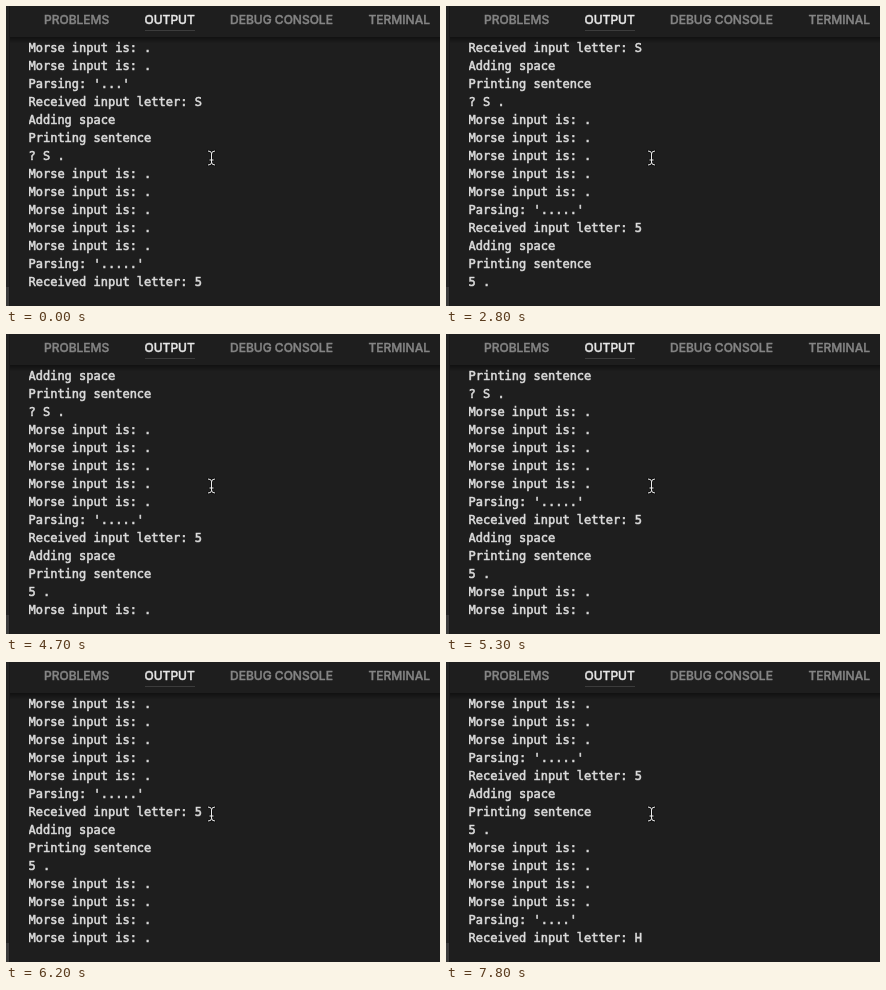
Write an HTML page that moves like this. It is 434x300 px and loops after 8 s.

```html
<!DOCTYPE html>
<html lang="en">
<head>
<meta charset="utf-8">
<title>Morse output panel</title>
<style>
  html, body { margin: 0; width: 100%; height: 100%; overflow: hidden; background: #1e1e1e; }
  .panel { position: relative; width: 434px; height: 300px; overflow: hidden; background: #1e1e1e; }
  .chrome { position: absolute; left: 0; top: 0; }
  .tab { font: 500 12px Inter, sans-serif; fill: #858585; stroke: #858585; stroke-width: .4px; }
  .tab.active { fill: #e7e7e7; stroke: #e7e7e7; }
  .output { position: absolute; left: 22.5px; top: 33px; width: 400px; height: 252px; overflow: hidden; }
  .log {
    --row: -18px;
    margin: 0;
    font: 12px/18px "DejaVu Sans Mono", monospace;
    color: #dcdcdc;
    -webkit-text-stroke: .55px #dcdcdc;
    animation: scroll 8s step-end infinite;
  }
  /* Each jump reveals newly printed lines at the bottom. */
  @keyframes scroll {
    0%     { transform: none; }
    10%    { transform: translateY(var(--row)); }
    35%    { transform: translateY(calc(3 * var(--row))); }
    58.75% { transform: translateY(calc(4 * var(--row))); }
    66.25% { transform: translateY(calc(5 * var(--row))); }
    71.25% { transform: translateY(calc(6 * var(--row))); }
    77.5%  { transform: translateY(calc(7 * var(--row))); }
    90%, 100% { transform: translateY(calc(9 * var(--row))); }
  }
</style>
</head>
<body>
<div class="panel">
  <div class="output"><pre class="log">Morse input is: .
Morse input is: .
Parsing: '...'
Received input letter: S
Adding space
Printing sentence
? S .
Morse input is: .
Morse input is: .
Morse input is: .
Morse input is: .
Morse input is: .
Parsing: '.....'
Received input letter: 5
Adding space
Printing sentence
5 .
Morse input is: .
Morse input is: .
Morse input is: .
Morse input is: .
Parsing: '....'
Received input letter: H</pre></div>
  <svg class="chrome" width="434" height="300">
    <defs>
      <linearGradient id="shade" x2="0" y2="1">
        <stop offset="0" stop-color="#000" stop-opacity=".4"/>
        <stop offset="1" stop-color="#000" stop-opacity="0"/>
      </linearGradient>
      <path id="beam" d="M202.500 145q3 0 3 2.500v9q0 2.500-3 2.500M208.500 145q-3 0-3 2.500M205.500 156.500q0 2.500 3 2.500M204 154h3"/>
    </defs>
    <rect x="3" y="31" width="431" height="6" fill="url(#shade)"/>
    <rect width="3" height="300" fill="#232323"/>
    <rect y="281" width="3" height="19" fill="#3a3a3a"/>
    <rect x="3" width="1" height="300" fill="#191919"/>
    <text class="tab" x="38" y="18">PROBLEMS</text>
    <text class="tab active" x="138.5" y="18">OUTPUT</text>
    <text class="tab" x="224" y="18">DEBUG CONSOLE</text>
    <text class="tab" x="362.5" y="18">TERMINAL</text>
    <rect x="139" y="24" width="50" height="1" fill="#3c3c3c"/>
    <g fill="none" stroke-linecap="square">
      <use href="#beam" stroke="#111" stroke-width="2.4"/>
      <use href="#beam" stroke="#eee"/>
    </g>
  </svg>
</div>
</body>
</html>
```
